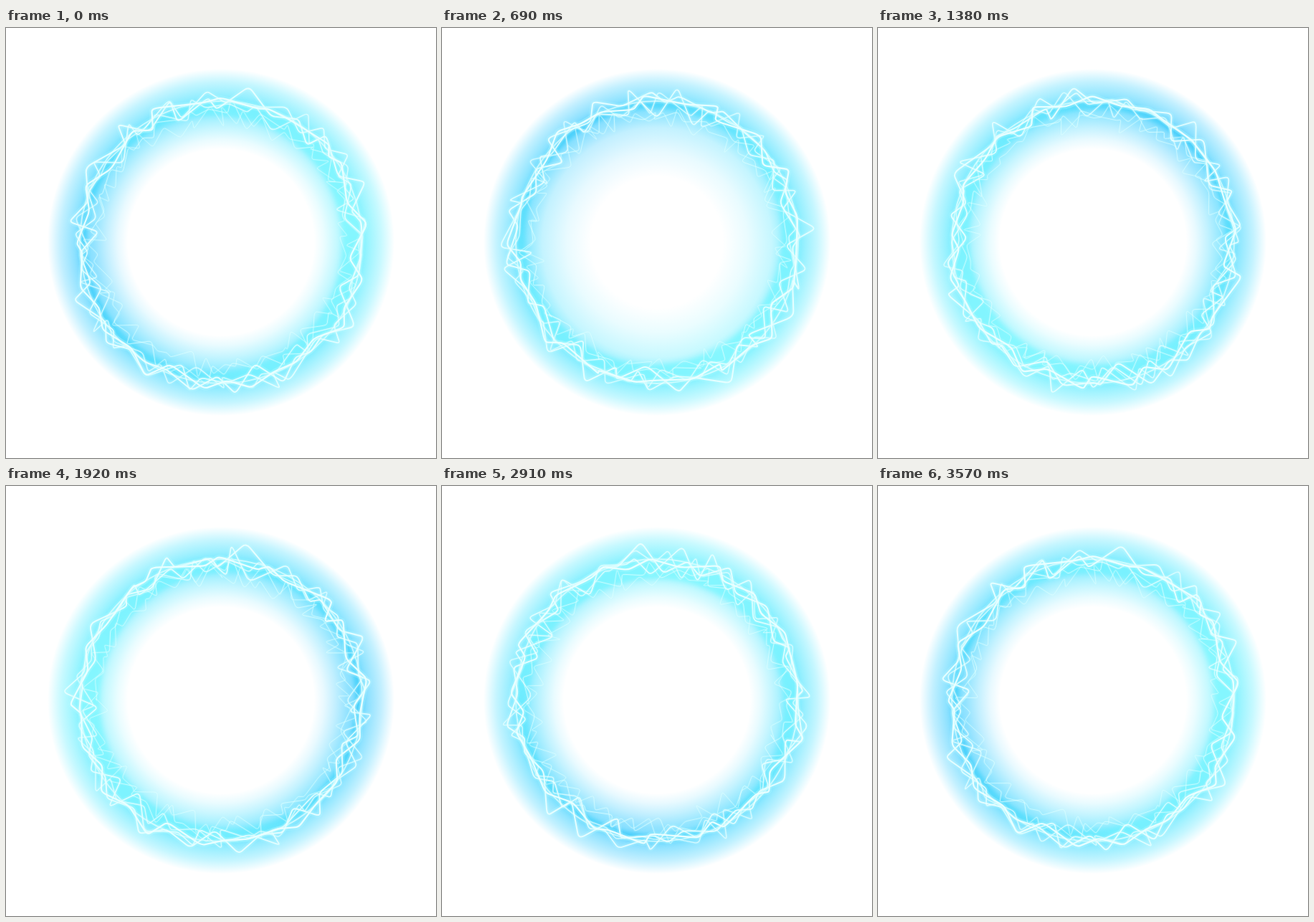
An HTML page with a canvas that plays this animation: 600x600 px, repeating every 3.6 s.

```html
<!DOCTYPE html>
<html lang="en">
<head>
<meta charset="utf-8">
<title>Electric ring</title>
<style>
  html, body { margin: 0; height: 100%; overflow: hidden; background: #fff; }
  canvas { display: block; }
</style>
</head>
<body>
<canvas id="stage" width="600" height="600"></canvas>
<script>
const ctx = document.getElementById('stage').getContext('2d');
const LOOP = 3600, STEP = 30, TAU = Math.PI * 2;
const CX = 300, CY = 299, RADIUS = 197;

let seed = 41;
function random() {
  seed = (seed * 16807) % 2147483647;
  return seed / 2147483647;
}

// A closed bolt whose knots swing around the ring at whole multiples of the loop.
function makeBolt(count, base, swing, width, alpha) {
  const knots = Array.from({ length: count }, (_, i) => ({
    angle: (i + random() * 0.8) / count * TAU,
    side: i % 2 ? 1 : -1,
    size: 0.5 + random() * 0.5,
    phase: random() * TAU,
    drift: random() * TAU,
    speed: 1 + Math.floor(random() * 3)
  }));
  return { knots, base, swing, width, alpha };
}

const bolts = [
  makeBolt(76, 174, 17, 1, 0.5),
  makeBolt(64, 181, 18, 1, 0.6),
  makeBolt(52, 193, 22, 1.4, 0.75),
  makeBolt(46, 196, 23, 1.8, 0.85),
  makeBolt(40, 197, 21, 2.1, 0.9),
  makeBolt(34, 197, 14, 2.3, 0.95)
];

function knotPoint(knot, bolt, turn) {
  const wave = Math.sin(turn * knot.speed + knot.phase);
  const r = bolt.base + bolt.swing * knot.size * (0.65 * knot.side + 0.6 * wave);
  const a = knot.angle + 0.05 * Math.sin(turn * 2 + knot.drift);
  return [CX + r * Math.cos(a), CY + r * Math.sin(a)];
}

const mix = (p, q, k) => [p[0] + (q[0] - p[0]) * k, p[1] + (q[1] - p[1]) * k];

function drawBolt(bolt, turn) {
  const points = bolt.knots.map(knot => knotPoint(knot, bolt, turn));
  const n = points.length;
  const path = new Path2D();
  points.forEach((p, i) => {
    const enter = mix(p, points[(i + n - 1) % n], 0.15);
    const leave = mix(p, points[(i + 1) % n], 0.15);
    if (i) path.lineTo(...enter); else path.moveTo(...enter);
    path.quadraticCurveTo(...p, ...leave);
  });
  path.closePath();
  strokeGlow(path, bolt.width, bolt.alpha);
}

function strokeGlow(path, width, alpha) {
  ctx.strokeStyle = `rgba(190, 250, 255, ${alpha * 0.25})`;
  ctx.lineWidth = width * 3.2;
  ctx.stroke(path);
  ctx.strokeStyle = `rgba(236, 255, 255, ${alpha})`;
  ctx.lineWidth = width;
  ctx.stroke(path);
}

// Pale cyan at the heading, deeper blue opposite.
function tint(heading, pale, middle, deep) {
  const colors = ctx.createConicGradient(heading, CX, CY);
  [pale, middle, deep, middle, pale].forEach((c, i) => colors.addColorStop(i / 4, c));
  return colors;
}

// A tinted stage under a white veil; each stop gives the glow left at a radius.
function drawHalo(heading, stops) {
  ctx.fillStyle = tint(heading, '#55efff', '#4be2ff', '#40ccff');
  ctx.fillRect(0, 0, 600, 600);
  const inner = stops[0][0], outer = stops[stops.length - 1][0];
  const veil = ctx.createRadialGradient(CX, CY, inner, CX, CY, outer);
  for (const [r, glow] of stops)
    veil.addColorStop((r - inner) / (outer - inner), `rgba(255, 255, 255, ${1 - glow})`);
  ctx.fillStyle = veil;
  ctx.fillRect(0, 0, 600, 600);
}

// The band is thickest at the heading and thinnest opposite.
function drawBand(heading) {
  const band = new Path2D();
  band.arc(CX, CY, RADIUS, 0, TAU);
  band.closePath();
  const x = CX - 9 * Math.cos(heading), y = CY - 9 * Math.sin(heading);
  band.moveTo(x + 179, y);
  band.arc(x, y, 179, 0, TAU);
  ctx.fillStyle = tint(heading, '#86f7ff', '#74efff', '#40ccfa');
  ctx.filter = 'blur(3px)';
  ctx.fill(band, 'evenodd');
  ctx.filter = 'none';
}

function drawRim() {
  const rim = new Path2D();
  rim.arc(CX, CY, RADIUS, 0, TAU);
  strokeGlow(rim, 2, 0.7);
}

const pulse = (t, at, width) => Math.exp(-(((t - at) / width) ** 2));

function draw(t) {
  const turn = t / LOOP * TAU, heading = turn - 0.17;
  const spread = pulse(t, 690, 120) + 0.5 * pulse(t, 2550, 120);
  drawHalo(heading, [[130 - 38 * spread, 0], [144 - 18 * spread, 0.12], [160, 0.32], [178, 0.58],
                     [198, 0.7], [210, 0.52], [224, 0.32], [234, 0.14], [242, 0]]);
  drawBand(heading);
  drawRim();
  for (const bolt of bolts) drawBolt(bolt, turn);
}

ctx.lineJoin = 'round';
function tick() {
  const t = performance.now() % LOOP;
  draw(Math.floor(t / STEP) * STEP);
  requestAnimationFrame(tick);
}
tick();
</script>
</body>
</html>
```
